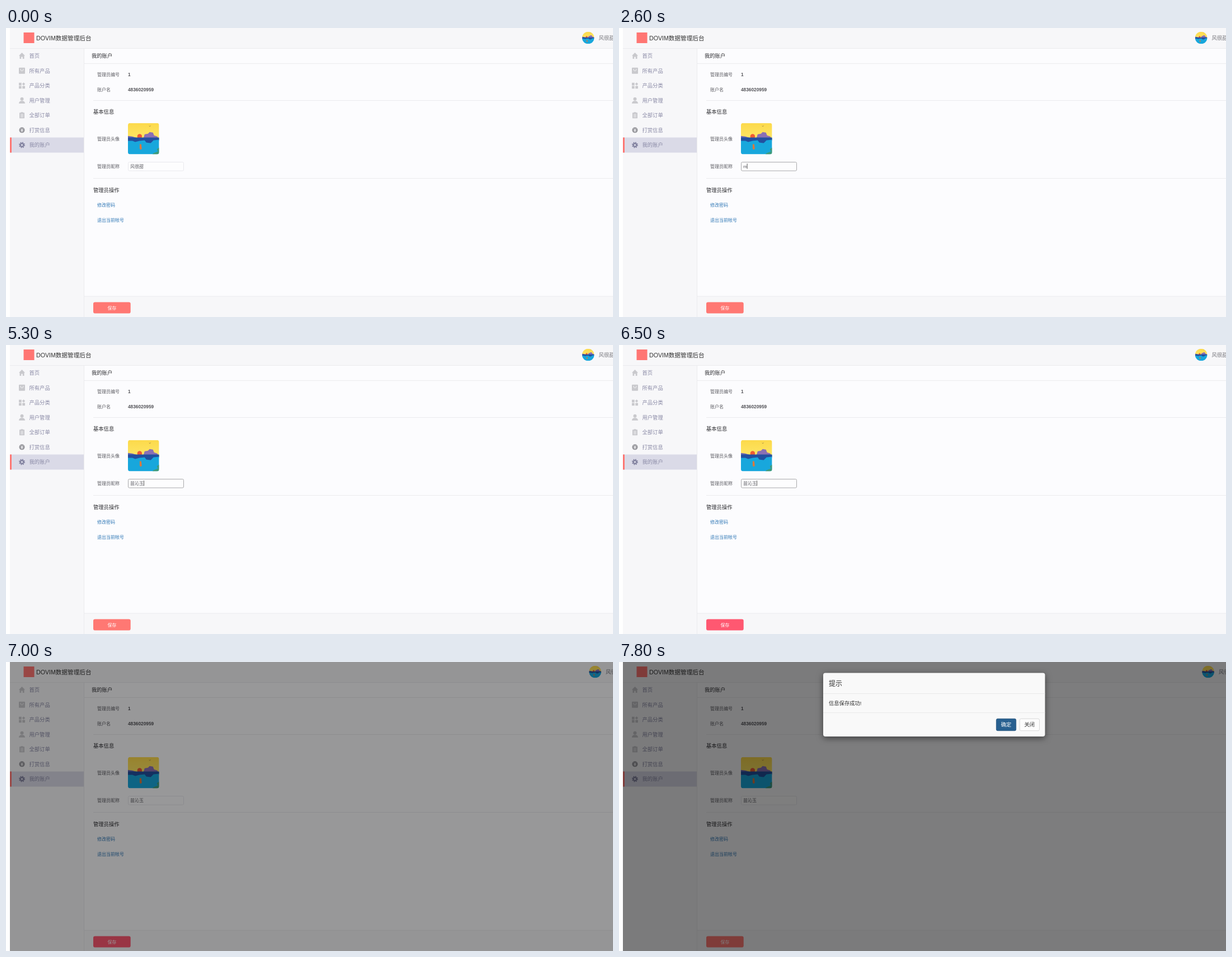
Recreate the animation shown at these times as an HTML page. Size 1085x516 px, loop 8000 ms.

```html
<!DOCTYPE html>
<html lang="zh-CN">
<head>
<meta charset="utf-8">
<style>
html, body { margin: 0; width: 100%; height: 100%; overflow: hidden; background: #fff; }
svg { display: block; width: 1085px; height: 516px; font: 9.3px "Liberation Sans", "Noto Sans CJK SC", "Noto Sans CJK", sans-serif; }
.small { font-size: 8px; fill: #5c5c62; }
.num { font-size: 8.3px; font-weight: bold; fill: #55555a; }
.head { fill: #2b2b2f; }
.link { font-size: 8px; fill: #337ab7; }
.line { stroke: #ebebee; }
.mid { text-anchor: middle; }
#nav { fill: #8a8aa6; }
#nav g { fill: #c9c9cd; }
#nav .on { fill: #8585a2; }
.cut { fill: none; stroke: #f7f7f9; }
#box { filter: drop-shadow(0 3px 6px rgba(0,0,0,.5)); }
</style>
</head>
<body>
<svg viewBox="0 0 1085 516">
  <defs>
    <linearGradient id="sky" x2="0" y2="1"><stop stop-color="#fcd94b"/><stop offset="1" stop-color="#fde766"/></linearGradient>
    <clipPath id="round"><rect width="56" height="56" rx="4"/></clipPath>
    <clipPath id="disc"><circle cx="28" cy="28" r="28"/></clipPath>
    <g id="scene">
      <rect width="56" height="30" fill="url(#sky)"/>
      <circle cx="21" cy="24" r="4.3" fill="#ef5a34"/>
      <path d="M28 27l2-7 6-1 3-3 6 1 2 5 6 2 1 4z" fill="#8b70b4"/>
      <path d="M0 23l8 1 9 3h39v5H0z" fill="#6c68b4"/>
      <rect y="27" width="56" height="29" fill="#18a7dc"/>
      <path d="M0 26h56v4l-10 1-5 5-8-1-3-4-9 1-8 2-5-2H0z" fill="#23509f"/>
      <path d="M21 38h3l1 8-2 2-2-2z" fill="#d9793f"/>
      <path d="M56 44l-4 3 2 4-8 3-2 2h12z" fill="#3f9a78"/>
      <path d="M38 5l1.500 1L41 4.500" fill="none" stroke="#8a6a3a" stroke-width=".7"/>
    </g>
  </defs>

  <rect x="7" width="1078" height="516" fill="#f7f7f9"/>
  <rect x="139.500" y="37" width="946" height="442" fill="#fcfcfe"/>
  <path class="line" d="M7 36.500H1085M139.500 37V516M140 63.500H1085M140 479H1085M156 129.500H1085M156 268.500H1085"/>

  <rect x="31.500" y="8" width="19" height="19" fill="#ff7673"/>
  <text x="54" y="22.300" font-size="10.64" fill="#333">DOVIM数据管理后台</text>
  <g id="user">
    <use href="#scene" clip-path="url(#disc)" transform="translate(1029.800 6.700) scale(.386)"/>
    <text x="1059.500" y="21" fill="#77777d">风很甜</text>
  </g>

  <rect x="7" y="195.500" width="132" height="27" fill="#dadae7"/>
  <rect x="7" y="195.500" width="3" height="27" fill="#ff7673"/>
  <g id="nav"></g>

  <text class="head" x="153" y="53.300">我的账户</text>
  <text class="small" x="163" y="86">管理员编号</text><text class="num" x="218" y="86">1</text>
  <text class="small" x="163" y="113">账户名</text><text class="num" x="218" y="113">4836020959</text>
  <text class="head" x="156" y="153">基本信息</text>
  <text class="small" x="163" y="200.500">管理员头像</text>
  <use href="#scene" clip-path="url(#round)" transform="translate(218 169.800) scale(.993)"/>
  <text class="small" x="163" y="249.500">管理员昵称</text>
  <rect id="input" x="218.500" y="239.500" width="99" height="15.500" rx="2" fill="#fdfdfe"/>
  <rect id="pick" x="222" y="241" width="24" height="11" fill="#3390ff"/>
  <text id="field" class="small" x="222" y="249.500"></text>
  <rect id="caret" y="242" width=".8" height="9.500" fill="#333"/>
  <text class="head" x="156" y="292.500">管理员操作</text>
  <text class="link" x="163" y="318.500">修改密码</text>
  <text class="link" x="163" y="345.500">退出当前帐号</text>
  <rect id="save" x="156" y="489.500" width="66.700" height="20" rx="3"/>
  <text class="small mid" x="189.500" y="502.500" style="fill:#fff">保存</text>
  <g id="ime"></g>

  <rect id="shade" x="7" width="1078" height="516"/>
  <g id="modal">
    <rect id="box" x="365" y="19.500" width="396.500" height="113.500" rx="4" fill="#f9f9f9"/>
    <path d="M365 56.500H761.500M365 90.500H761.500" stroke="#e5e5e5" stroke-width=".8"/>
    <text x="375" y="42.700" font-size="12" fill="#333">提示</text>
    <text x="375" y="76.700" fill="#333">信息保存成功!</text>
    <rect id="ok" x="674.400" y="101.300" width="35.300" height="21.400" rx="2.500" stroke-width=".7"/>
    <text class="mid" x="692" y="115.300" fill="#fff">确定</text>
    <rect x="716.200" y="101.300" width="35.300" height="21.400" rx="2.500" fill="#fdfdfd" stroke="#ccc" stroke-width=".7"/>
    <text class="mid" x="733.800" y="115.300" fill="#333">关闭</text>
  </g>
</svg>
<script>
const $ = id => document.getElementById(id);
const set = (id, attrs) => { for (const k in attrs) $(id).setAttribute(k, attrs[k]); };

// Icons fill an 11 x 11 box
const menu = [
  ['首页', '<path d="M5.500 0L11 5.500H9.500V11H6.800V7.500H4.200V11H1.500V5.500H0z"/>'],
  ['所有产品', '<rect width="11" height="11" rx="1"/><path class="cut" d="M3 2.500q0 3.500 2.500 3.500t2.500-3.500"/>'],
  ['产品分类', '<path d="M0 .5h4.700v4.700H0zM0 6.300h4.700V11H0zM6.300 6.300H11V11H6.300zM8.500 0l2.700 2.800-2.700 2.800-2.700-2.800z"/>'],
  ['用户管理', '<circle cx="5.500" cy="3" r="3"/><path d="M0 11q0-3.500 3.500-4.500h4q3.500 1 3.500 4.500z"/>'],
  ['全部订单', '<path d="M1 1h2.500V0h4v1H10v10H1z"/><path class="cut" stroke-width=".8" d="M3 4h5M3 6.200h5M3 8.400h5"/>'],
  ['打赏信息', '<circle cx="5.500" cy="5.500" r="5" fill="#98989d"/><path class="cut" stroke-width=".9" d="M3.500 2.500l2 2.500 2-2.500M5.500 5v3.700M3.500 5.300h4M3.500 7h4"/>'],
  ['我的账户', '<circle class="on" cx="5.500" cy="5.500" r="4.200"/><circle cx="5.500" cy="5.500" r="4.500" fill="none" stroke="#8585a2" stroke-width="2" stroke-dasharray="1.770"/><circle cx="5.500" cy="5.500" r="1.700" fill="#dadae7"/>']
];
$('nav').innerHTML = menu.map(([label, icon], i) => {
  const y = 49.600 + 26.550 * i;
  return `<g transform="translate(23 ${y - 5.5})">${icon}</g><text x="41.500" y="${y + 3.5}">${label}</text>`;
}).join('');

// [start, text, caret visible, input candidates]
const typing = [
  [0, '风很甜', 0], [1400, '风很甜', 1], [1800, '风很甜', 0],
  [2600, 'm', 1], [2700, 'mq', 1], [3300, 'mq', 0], [3500, 'm', 1], [3700, '', 1],
  [4300, 'm', 1, '吗 没 每 买 名 妈 门'],
  [4500, "m'q", 1, '目前 明确 面前 母亲 民企 每期 美其'],
  [4800, "m'q", 0, '目前 明确 面前 母亲 民企 每期 美其'],
  [5100, "m'q'y", 1, '苗沁玉 目前有 没权益 明确要 每区域 母亲要 民企业'],
  [5300, '苗沁玉', 1], [5800, '苗沁玉', 0], [6200, '苗沁玉', 1], [6700, '苗沁玉', 0]
];

function candidates(list) {
  if (!list) return '';
  const words = list.split(' '), step = 32 + 13 * words[0].length, end = 221 + step * words.length;
  return `<rect x="221.500" y="251.500" width="${step * words.length + 84}" height="32" fill="#fff" stroke="#d0d0d0"/>` +
    words.map((w, i) => `<text x="${230 + i * step}" y="272.500" font-size="13" fill="${i ? '#222' : '#0078d7'}">` +
      `<tspan font-size="10">${i + 1}</tspan><tspan dx="5">${w}</tspan></text>`).join('') +
    `<path d="M${end + 20} 263l-4 4.500 4 4.500M${end + 40} 263l4 4.500-4 4.500" fill="none" stroke="#777"/>`;
}

let shown;
function draw(t) {
  const now = typing.findLast(s => s[0] <= t);
  if (now !== shown) {
    shown = now;
    $('field').textContent = now[1];
    $('ime').innerHTML = candidates(now[3]);
    set('caret', { x: 222 + (now[1] ? $('field').getComputedTextLength() : 0), opacity: now[2] });
  }
  const picked = t >= 1800 && t < 2600, left = t >= 6900;
  set('pick', { opacity: +picked });
  $('field').style.fill = picked ? '#fff' : '';
  set('input', { stroke: t >= 1400 && !left ? '#a9a9ab' : '#e9e9ee' });
  set('save', { fill: t >= 6500 && t < 7100 ? '#ff5871' : '#ff7873' });
  set('user', { transform: `translate(${left ? 12.5 : 0} 0)` });

  const ramp = (start, len) => Math.min(1, Math.max(0, (t - start) / len));
  set('shade', { opacity: 0.5 * ramp(6888, 140) });
  set('modal', {
    opacity: ramp(7012, 150),
    transform: `translate(0 ${-28.4 * (1 - ramp(7012, 300)) ** 1.7})`
  });
  set('ok', t >= 7800 ? { fill: '#286090', stroke: '#204d74' } : { fill: '#337ab7', stroke: '#2e6da4' });
}

const begin = performance.now();
function tick() {
  const t = (performance.now() - begin) % 8000;
  draw(Math.floor(t / 100) * 100);
  requestAnimationFrame(tick);
}
tick();
</script>
</body>
</html>
```
